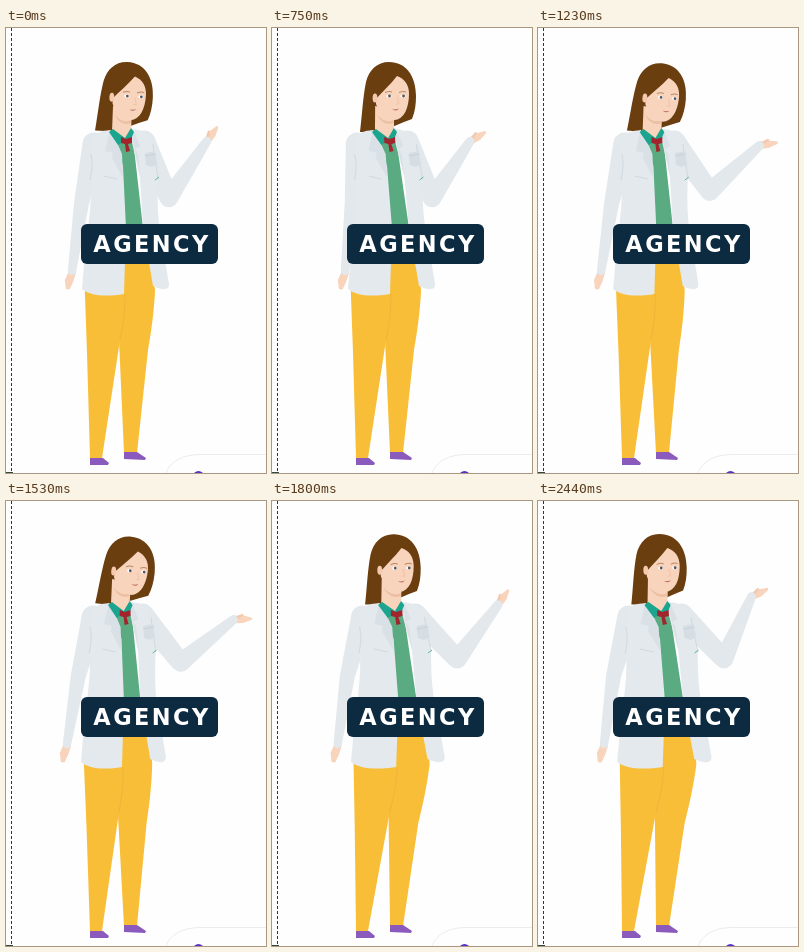
Write an HTML page that moves like this. It is 260 px wide and 445 px high and loops after 2.54 s.

```html
<!DOCTYPE html>
<html lang="en">
<head>
<meta charset="utf-8">
<title>Agency</title>
<style>
  html, body { margin: 0; width: 100%; height: 100%; overflow: hidden; background: #fefefe; }
  svg { display: block; width: 260px; height: 445px; }
  text { font: bold 22.5px "DejaVu Sans", sans-serif; letter-spacing: 2.4px; fill: #fff; }
</style>
</head>
<body>
<svg viewBox="0 0 260 445" xmlns="http://www.w3.org/2000/svg">
  <path d="M5.5 0V445" stroke="#333" stroke-dasharray="3 2"/>
  <path d="M160 445C164 434 176 426.500 194 426.500H260" fill="none" stroke="#ececec"/>
  <circle cx="192.500" cy="448.500" r="5.500" fill="#5a2fc8"/>
  <path d="M0 444.500H7" stroke="#35483f"/>
  <g id="figure"></g>
  <rect x="75" y="196" width="137" height="40" rx="6" fill="#0c2a40"/>
  <text x="146" y="224" text-anchor="middle">AGENCY</text>
</svg>
<script>
const loop = 2540, steps = 20;
const figure = document.getElementById('figure');
const skin = '#f8d4bc', coat = '#e4e9ed', sleeve = '#e2e8ec', lapel = '#dae1e6', seam = '#d1d9df';
const trousers = '#f8be38', shoe = '#8a5bbd';

function add(tag, attrs, parent = figure) {
  const el = document.createElementNS('http://www.w3.org/2000/svg', tag);
  for (const name in attrs) el.setAttribute(name, attrs[name]);
  return parent.appendChild(el);
}
const shape = fill => add('path', { fill });

const bodyParts = [];
function body(d, fill, stroke = 'none') {
  bodyParts.push({ el: add('path', { fill, stroke }), d });
}

// Legs and shoes
body('M78 240 L121 236 L119 266 C119 285 117 297 114 312 L96 430 L84 430 L81 325 Z', trousers);
body('M118 234 L147 234 L149 263 C148 285 145 305 142 322 L131 425 L118 425 L113 312 Z', trousers);
body('M114 312 C117 297 119 285 119 266', 'none', '#f0b43a');
body('M84 430 L97 430 L103 435 L102 437 L84 437 Z', shoe);
body('M118 424 L131 424 L140 430 L139 432 L118 431 Z', shoe);

const hair = add('path', {
  fill: '#6b3e10',
  d: 'M119 34C107 34 99 42 96 54C93 68 92 88 90 104H110L134 94L142 91C145 84 146 76 146 68C146 48 136 34 119 34Z'
});

// Arms
const leftHand = shape(skin), leftSleeve = shape(sleeve);
const rightHand = shape(skin), thumb = shape('#f3c8ad'), rightSleeve = shape(sleeve);

// Neck, shirt and coat
body('M107 78 L126 82 L125 102 L119 112 L106 104 Z', skin);
body('M108 86 C113 92 119 95 125 92 L125 95 C118 98 112 94 108 86 Z', '#ecc0a4');
body('M106 104 L119 111 L126 102 L137 200 L118 200 L112 120 Z', '#5aab82');
body('M104 102 C96 103 88 104 85 112 L85 150 C86 175 82 200 79 225 L76 261 C84 268 100 269 118 266 L120 200 L117 138 L107 106 Z', coat);
body('M126 101 C136 102 143 104 147 114 L152 150 C151 180 152 195 157 220 L163 256 C163 262 158 263 147 258 L137 200 L134 150 L125 110 Z', coat);
body('M104 102 L99 123 L107 125 L106 130 L117 150 L116 126 L107 105 Z', lapel);
body('M127 101 L134 118 L129 121 L132 126 L134 148 L126 108 Z', lapel);
body('M85 126 C87 137 86 143 84 152', 'none', seam);
body('M98 148 L111 151', 'none', seam);
body('M147 116 C148 130 151 140 152 151', 'none', seam);
body('M139 125 L149 123 L151 136 L146 139 L140 137 Z', '#d7dee3');
body('M139 128 L150 126', 'none', '#c9d2d9');
body('M149 152 L153 149', 'none', '#62b79d');
body('M103 104 L107 101 L119 110 L125 100 L128 104 L123 116 L118 113 L112 117 Z', '#1ba58e');
body('M115 109 L120 111 L126 109 L126 115 L122 116 L124 123 L120 124 L119 116 L115 115 Z', '#a2242d');

// Face
const face = add('g', {});
add('path', { fill: skin, d: 'M106 71C112 64 120 57 127 48C135 51 139 57 139 66C139 80 134 91 125 92C116 92 109 85 106 76Z' }, face);
add('ellipse', { cx: 105, cy: 70, rx: 2.4, ry: 4.5, fill: '#f4c9ae' }, face);
const features = add('g', {}, face);
for (const x of [120, 134]) {
  add('ellipse', { cx: x, cy: 68, rx: 2.6, ry: 1.6, fill: '#fff' }, features);
  add('circle', { cx: x + .5, cy: 68, r: 1.4, fill: '#4c5560' }, features);
  add('path', { d: `M${x - 4} 64.500q4 -2 7 -.5`, fill: 'none', stroke: '#b98a66' }, features);
}
add('path', { d: 'M128 69L130 76L127 76', fill: 'none', stroke: '#f0c3a6' }, features);
add('path', { d: 'M123 81Q126 82 130 80.500Q127 84 123 81Z', fill: '#b9615b' }, features);

// The hips carry the sway; the feet stay planted.
function warp(x, y, sway, lean) {
  const reach = y < 200 ? 4 + 2.5 * (y - 105) / 95
    : 6.5 * Math.min(1, Math.max(0, (430 - y) / 165)) ** 1.5;
  const top = lean * Math.max(0, (200 - y) / 95);
  return [x + top + sway * reach * (1 + (x - 115) * .013), y];
}

// A tapered limb: joints are [x, y, radius].
function limb(...joints) {
  return joints.map(([x, y, r], i) => {
    const ball = `M${x - r} ${y}a${r} ${r} 0 1 0 ${2 * r} 0a${r} ${r} 0 1 0 ${-2 * r} 0Z`;
    if (!i) return ball;
    const [px, py, pr] = joints[i - 1];
    const len = Math.hypot(x - px, y - py) || 1;
    const nx = (py - y) / len, ny = (x - px) / len;
    return ball + `M${px + nx * pr} ${py + ny * pr}L${x + nx * r} ${y + ny * r}` +
      `L${x - nx * r} ${y - ny * r}L${px - nx * pr} ${py - ny * pr}Z`;
  }).join('');
}

// A point at a distance and an upward angle in degrees.
function along([x, y], length, degrees) {
  const a = degrees * Math.PI / 180;
  return [x + length * Math.cos(a), y - length * Math.sin(a)];
}

const ramp = (t, from, to) => Math.min(1, Math.max(0, (t - from) / (to - from)));

function draw(t) {
  const drop = ramp(t, 0, 370);
  const turn = ramp(t, 990, 1270);
  const offer = ramp(t, 1080, 1260);
  const shift = ramp(t, 1530, 1800);
  const fold = ramp(t, 1800, 2080);

  const sway = 1.3 * shift - .3 * turn;
  const lean = -3 * drop * (1 - turn);
  for (const { el, d } of bodyParts) {
    el.setAttribute('d', d.replace(/([\d.]+) ([\d.]+)/g,
      (_, x, y) => warp(+x, +y, sway, lean).join(' ')));
  }

  const headX = -2 * drop + 3 * turn + 2 * shift;
  const headY = 1.5 * turn - 2.5 * shift;
  const tilt = 3 - 3 * drop + 6 * turn - 7 * shift;
  const headMove = `translate(${headX} ${headY}) rotate(${tilt} 120 85)`;
  hair.setAttribute('transform', headMove);
  face.setAttribute('transform', headMove);
  features.setAttribute('transform', `translate(${2 * turn - drop - shift} 0)`);

  const handAngle = 54 - 23 * drop - 28 * offer + 55 * shift - 32 * fold;
  const shoulder = warp(138, 114, sway, lean);
  const elbow = along(shoulder, 61, -66 + 15 * offer + 5 * shift);
  const wrist = along(elbow, 68, 56 - 17 * offer + 15 * shift + 12 * fold);
  const palm = along(wrist, 9, handAngle), tip = along(wrist, 17, handAngle);
  rightSleeve.setAttribute('d', limb([...shoulder, 11.5], [...elbow, 9.5], [...wrist, 4.5]));
  rightHand.setAttribute('d', limb([...wrist, 3.6], [...palm, 3.8], [...tip, 1.5]));
  thumb.setAttribute('d', limb([...wrist, 2], [...along(wrist, 10, handAngle + 25), 1]));

  const cuff = 66 + 7 * drop * (1 - turn) - 5 * turn + 5 * shift;
  const leftShoulder = warp(88, 116, sway, lean);
  leftSleeve.setAttribute('d', limb([...leftShoulder, 11.5], [32 + .66 * cuff, 175, 7.5], [cuff, 243, 4.2]));
  leftHand.setAttribute('d', limb([cuff, 245, 3.8], [cuff - 3, 253, 4.2], [cuff - 4, 259, 2.5]));
}

// Held poses, with the stretch around the offered hand slower than the rest.
const holdOf = step => step >= 10 && step < 16 ? 141 : 122;

const began = performance.now();
function tick(now) {
  const phase = Math.max(0, now - began) % loop;
  let start = 0;
  for (let step = 0; step < steps && start + holdOf(step) <= phase; step++) start += holdOf(step);
  draw(start);
  requestAnimationFrame(tick);
}
draw(0);
requestAnimationFrame(tick);
</script>
</body>
</html>
```
